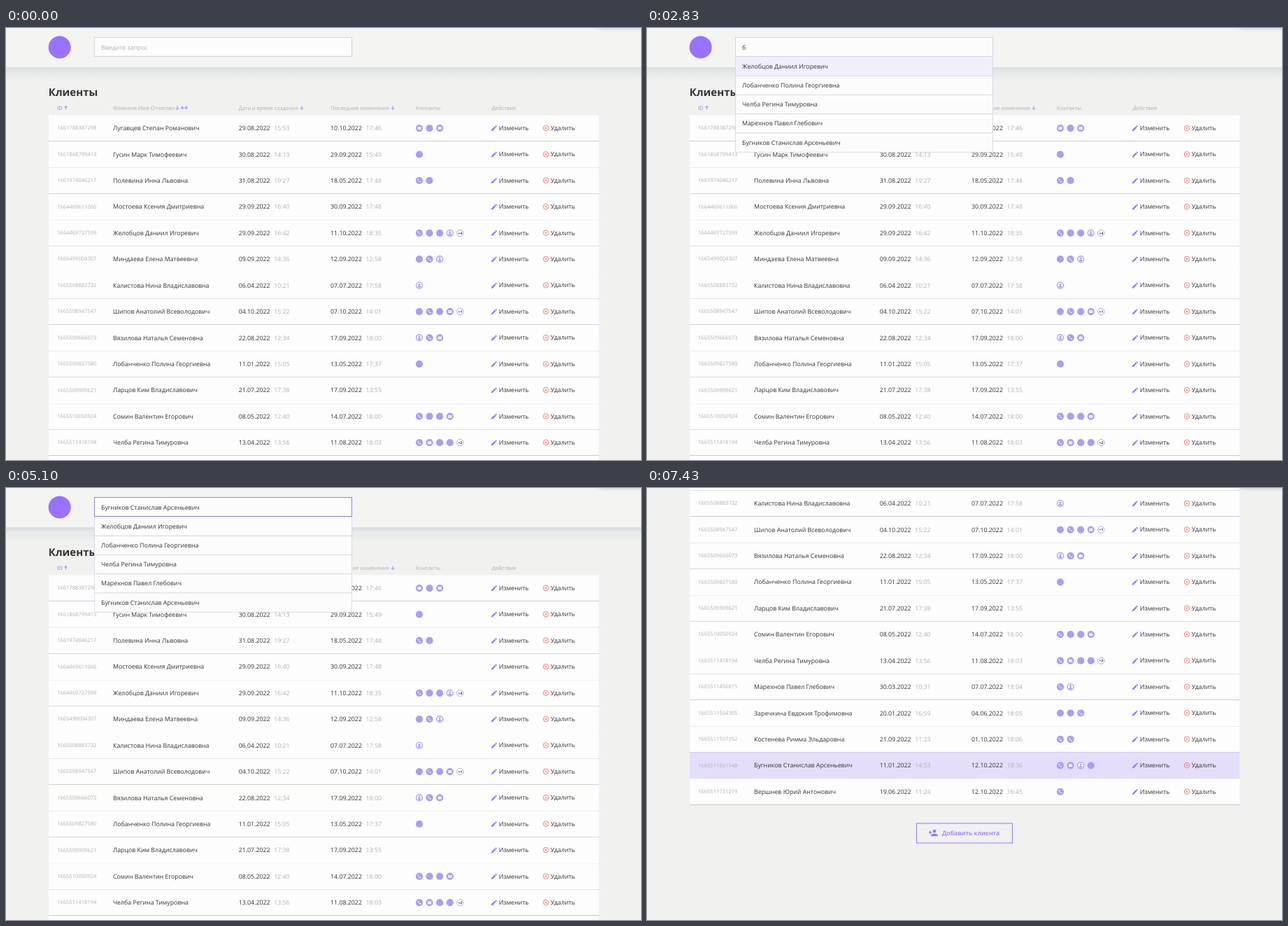
Recreate the animation shown at these times as an HTML page. Size 908 px wide and 617 px high, loop 7.46 s.

```html
<!DOCTYPE html>
<html lang="ru">
<head>
<meta charset="utf-8">
<title>Клиенты</title>
<style>
  html, body { margin: 0; width: 100%; height: 100%; overflow: hidden; background: #f1f1f0; }
  svg { display: block; width: 908px; height: 617px; }
  text { font: 8.8px "Open Sans", sans-serif; fill: #333; text-rendering: geometricPrecision; white-space: pre; }
  .muted { fill: #b0b0b0; }
  .small { font-size: 7.6px; }
  .purple { fill: #9873ff; }
  .bold { font-weight: 700; }
  .line { stroke: #c8c5d6; stroke-width: 1; shape-rendering: crispEdges; }
  .icon { fill: #ae9bf7; }
</style>
</head>
<body>
<svg viewBox="0 0 908 617">
  <defs>
    <linearGradient id="shade" x2="0" y2="1">
      <stop stop-color="#a9b8c2" stop-opacity=".34"/>
      <stop offset=".4" stop-color="#b0bec5" stop-opacity=".13"/>
      <stop offset="1" stop-color="#b0bec5" stop-opacity="0"/>
    </linearGradient>
    <filter id="blur" x="-50%" y="-200%" width="200%" height="500%"><feGaussianBlur stdDeviation="3"/></filter>
    <g id="dot"><circle class="icon" r="5.1"/></g>
    <g id="phone">
      <circle class="icon" r="5.1"/>
      <path transform="scale(.25) translate(-12 -12)" fill="#fff" d="M6.6 10.8c1.4 2.8 3.8 5.1 6.6 6.6l2.2-2.2 1-.3c1.2.4 2.4.6 3.6.6l1 1V20l-1 1C10.6 21 3 13.4 3 4l1-1h3.5l1 1c0 1.3.2 2.5.6 3.6l-.3 1z"/>
    </g>
    <g id="mail">
      <circle class="icon" r="5.1"/>
      <rect x="-2.6" y="-2" width="5.2" height="4" rx=".5" fill="#fff"/>
      <path d="M-2.2-1.3 0 .1 2.2-1.3" fill="none" stroke="#ae9bf7" stroke-width=".6"/>
    </g>
    <g id="user">
      <circle class="icon" r="5.1"/>
      <circle r="3.8" fill="#fff"/>
      <circle class="icon" cy="-1.2" r="1.5"/>
      <ellipse class="icon" cy="1.9" rx="2.5" ry="1.3"/>
    </g>
    <path id="pencil" class="purple" transform="scale(.44)" d="M3 17.25V21h3.75L17.8 9.94l-3.75-3.75zM20.7 7a1 1 0 0 0 0-1.4l-2.3-2.3a1 1 0 0 0-1.4 0l-1.9 1.8 3.8 3.8z"/>
    <path id="cross" d="M-1.6-1.6 1.6 1.6M1.6-1.6-1.6 1.6M3.8 0a3.8 3.8 0 1 1-7.6 0 3.8 3.8 0 1 1 7.6 0" fill="none" stroke="#ec7258" stroke-width=".85"/>
    <path id="arrow" d="M0-2.5V2.4M-2.2.3 0 2.5 2.2.3" fill="none" stroke="#9873ff" stroke-width=".9"/>
  </defs>

  <g id="page">
    <rect y="56" width="908" height="22" fill="url(#shade)"/>
    <rect width="908" height="56" fill="#f4f4f3"/>
    <circle cx="76.7" cy="27.5" r="16" class="purple"/>
    <text x="60.8" y="97.2" class="bold" style="font-size:15px">Клиенты</text>
    <g id="table"></g>
    <g transform="translate(385 824)">
      <rect x=".5" y=".5" width="137" height="28" fill="none" stroke="#9873ff"/>
      <path class="purple" transform="translate(17 6.8) scale(.6)" d="M15 12a4 4 0 1 0 0-8 4 4 0 0 0 0 8zM6 10V7H4v3H1v2h3v3h2v-3h3v-2zm9 4c-2.7 0-8 1.3-8 4v2h16v-2c0-2.7-5.3-4-8-4z"/>
      <text x="37" y="17" class="purple" style="font-weight:600">Добавить клиента</text>
    </g>
    <g id="list"></g>
    <rect id="field" x="126.5" y="13.5" width="368" height="27" fill="#fcfcfc"/>
    <text id="query" x="136" y="30.5"></text>
    <path id="spinner" d="M3.7-3.7A5.2 5.2 0 1 0 4.5 2.6" fill="none" stroke="#9873ff" stroke-width="1.4"/>
  </g>
  <rect x="848" y="-8" width="80" height="8" fill="#777" opacity=".4" filter="url(#blur)"/>
</svg>

<script>
const LOOP = 7460, ROW = 37.42, TOP = 124.5, ITEM = 27.25, MAX_SCROLL = 345.5;
const FOCUS = 800, TYPED = 1600, LOAD = 1850, LOADED = 2500, CHOSEN = 4300, LEAVE = 5185, SCROLL_TIME = 392;
const SELECT = [2700, 2950, 3200, 3455, 3750, CHOSEN];
const ICONS = { o: 'dot', p: 'phone', m: 'mail', u: 'user' };

// id | name | created | changed | contacts
const clients = `
1661788387298|Лугавцев Степан Романович|29.08.2022 15:53|10.10.2022 17:46|mom
1661868799413|Гусин Марк Тимофеевич|30.08.2022 14:13|29.09.2022 15:49|o
1661974046217|Полевина Инна Львовна|31.08.2022 19:27|18.05.2022 17:48|po
1664469611066|Мостоева Ксения Дмитриевна|29.09.2022 16:40|30.09.2022 17:48|
1664469727599|Желобцов Даниил Игоревич|29.09.2022 16:42|11.10.2022 18:35|poou4
1665499004307|Миндаева Елена Матвеевна|09.09.2022 14:36|12.09.2022 12:58|opu
1665508883732|Калистова Нина Владиславовна|06.04.2022 10:21|07.07.2022 17:58|u
1665508947547|Шипов Анатолий Всеволодович|04.10.2022 15:22|07.10.2022 14:01|opom1
1665509666073|Вязилова Наталья Семеновна|22.08.2022 12:34|17.09.2022 18:00|upm
1665509827580|Лобанченко Полина Георгиевна|11.01.2022 15:05|13.05.2022 17:37|o
1665509909621|Ларцов Ким Владиславович|21.07.2022 17:38|17.09.2022 13:55|
1665510050924|Сомин Валентин Егорович|08.05.2022 12:40|14.07.2022 18:00|poom
1665511418194|Челба Регина Тимуровна|13.04.2022 13:56|11.08.2022 18:03|pmoo2
1665511456815|Марехнов Павел Глебович|30.03.2022 10:31|07.07.2022 18:04|pu
1665511554305|Заречкина Евдокия Трофимовна|20.01.2022 16:59|04.06.2022 18:05|oop
1665511597252|Костенева Римма Эльдаровна|21.09.2022 11:23|01.10.2022 18:06|pp
1665511661548|Бугников Станислав Арсеньевич|11.01.2022 14:53|12.10.2022 18:36|pmuo
1665511731219|Вершнев Юрий Антонович|19.06.2022 11:24|12.10.2022 16:45|p`
  .trim().split('\n').map(line => line.split('|'));

const found = clients.map(c => c[1]).filter(name => /б/i.test(name));
const chosen = found[found.length - 1];

const $ = id => document.getElementById(id);
const text = (x, y, str, cls = '') => `<text x="${x}" y="${y}" class="${cls}">${str}</text>`;
const use = (id, x, y, extra = '') => `<use href="#${id}" transform="translate(${x} ${y}) ${extra}"/>`;
const stamp = (x, y, value) => {
  const [date, time] = value.split(' ');
  return text(x, y, date) + text(x + 50.5, y, time, 'muted');
};

function contact(kind, i, y) {
  const x = 591 + i * 14.6;
  if (ICONS[kind]) return use(ICONS[kind], x, y);
  return `<circle cx="${x}" cy="${y}" r="4.7" fill="none" stroke="#ae9bf7" stroke-width=".9"/>
    <text x="${x}" y="${y + 1.8}" text-anchor="middle" class="bold" style="font-size:5px">+${kind}</text>`;
}

function row([id, name, created, changed, contacts], i) {
  const y = TOP + i * ROW, mid = y + 18.6, base = mid + 3.1;
  return `<rect x="61" y="${y}" width="786.5" height="${ROW}" fill="${name === chosen ? '#e5defb' : '#fdfdfd'}"/>
    <path class="line" d="M61 ${y + ROW}h786.5"/>` +
    text(73, base - 0.9, id, 'muted small') + text(153, base, name) +
    stamp(332.7, base, created) + stamp(464, base, changed) +
    [...contacts].map((kind, k) => contact(kind, k, mid)).join('') +
    use('pencil', 692.7, mid - 5.2) + text(704.7, base - 0.3, 'Изменить') +
    use('cross', 772, mid - 0.2) + text(778.7, base - 0.3, 'Удалить');
}

const heads = [[153, 'Фамилия Имя Отчество'], [332.7, 'Дата и время создания'],
  [464, 'Последние изменения'], [586, 'Контакты'], [694.5, 'Действия']];
$('table').innerHTML = text(73, 116.8, 'ID', 'purple small') + use('arrow', 85.5, 114, 'rotate(180)') +
  heads.map(([x, label]) => text(x, 116.8, label, 'muted small')).join('') +
  [245, 423, 553].map(x => use('arrow', x, 114)).join('') +
  '<text x="250" y="116.2" class="purple bold" style="font-size:5.8px">А-Я</text>' +
  clients.map(row).join('');

$('list').innerHTML = found.map((name, i) => {
  const y = 41 + i * ITEM;
  return `<rect x="126.5" y="${y}" width="368" height="${ITEM}" fill="#fcfcfc" stroke="#d5d2e0" stroke-width=".8"/>
    <rect class="glow" x="127" y="${y + 0.5}" width="367" height="${ITEM - 1}" fill="#ede8fc"/>` +
    text(136, y + 16.7, name);
}).join('');
const glows = document.querySelectorAll('.glow');

const ramp = (t, start, time) => Math.min(1, Math.max(0, (t - start) / time));
// cubic-bezier(.42, 0, .58, 1)
function easeInOut(x) {
  let lo = 0, hi = 1;
  for (let i = 0; i < 20; i++) {
    const u = (lo + hi) / 2;
    if (1.26 * u * (1 - u) ** 2 + 1.74 * u * u * (1 - u) + u ** 3 < x) lo = u; else hi = u;
  }
  return lo * lo * (3 - 2 * lo);
}
const show = (id, on) => $(id).setAttribute('visibility', on ? 'visible' : 'hidden');

function draw() {
  const t = performance.now() % LOOP;
  const loading = t >= LOAD && t < LOADED;
  const focused = t >= FOCUS && !loading && (t < SELECT[0] || t >= CHOSEN);

  $('page').setAttribute('transform', `translate(0 ${-MAX_SCROLL * easeInOut(ramp(t, LEAVE, SCROLL_TIME))})`);
  $('field').setAttribute('stroke', focused ? '#9580e6' : loading ? '#cfc4f5' : '#d5d3dc');
  $('field').setAttribute('fill', loading ? '#f7f7f8' : '#fcfcfc');
  $('query').textContent = t < TYPED ? 'Введите запрос' : t < CHOSEN ? 'б' : chosen;
  $('query').setAttribute('class', t < TYPED ? 'muted' : '');
  show('spinner', loading);
  $('spinner').setAttribute('transform', `translate(480 28) rotate(${(t - 2000) * 0.36})`);
  show('list', t >= LOADED && t < LEAVE);
  glows.forEach((glow, i) =>
    glow.setAttribute('opacity', ramp(t, SELECT[i], 200) - ramp(t, SELECT[i + 1], 200)));
  requestAnimationFrame(draw);
}
draw();
</script>
</body>
</html>
```
